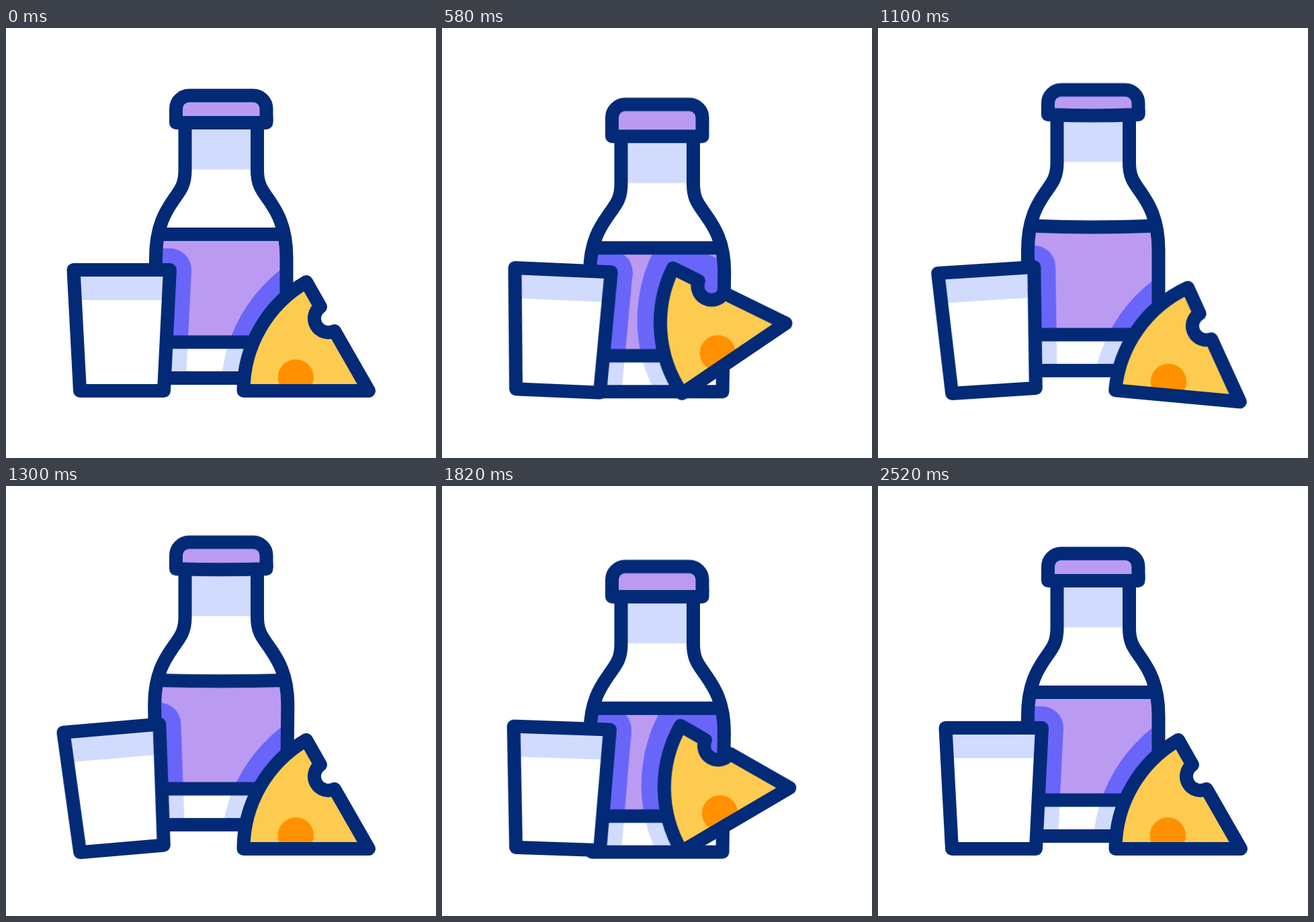
An HTML page that plays this animation: 640 px wide and 640 px high, repeating every 2.58 s.

```html
<!DOCTYPE html>
<html lang="en">
<head>
<meta charset="utf-8">
<title>Dairy</title>
<style>
  html, body { margin: 0; width: 100%; height: 100%; overflow: hidden; background: #fff; }
  svg { display: block; width: 100%; height: 100%; }

  .line { fill: none; stroke: #032a77; stroke-width: 20; stroke-linecap: round; stroke-linejoin: round; }
  .lilac { fill: #bb9bf2; }
  .pale { fill: #d1dbfd; }
  .shade { fill: currentColor; stroke: currentColor; stroke-linejoin: round; }

  .body, .cap, .glass, .cheese, .sides, .bands {
    animation: 2580ms cubic-bezier(.333, 0, .667, 1) infinite;
  }
  .body { animation-name: bounce; }
  .cap { animation-name: follow; }
  .glass { animation-name: sway; transform-origin: 172px 540px; }
  .cheese { animation-name: rock; transform-origin: 362px 536px; }
  .sides { animation-name: bulge; }
  .bands { animation-name: sag; }

  @keyframes bounce {
    0%, 10.1% { transform: translateY(0); }
    27.3% { transform: translateY(25px); }
    48.1% { transform: translateY(-18.5px); }
    68% { transform: translateY(24.5px); }
    93%, 100% { transform: translateY(0); }
  }
  @keyframes follow {
    0%, 11.6% { transform: translateY(0); }
    28.1% { transform: translateY(18px); }
    49.6% { transform: translateY(-17px); }
    69.4% { transform: translateY(19.5px); }
    93.4%, 100% { transform: translateY(0); }
  }
  @keyframes sway {
    0%, 7.75% { transform: rotate(0deg); }
    26.2% { transform: rotate(2.8deg); }
    48.8% { transform: rotate(-5.1deg); }
    65.5% { transform: rotate(2.8deg); }
    91.9% { transform: rotate(-6deg); }
    97.7%, 100% { transform: rotate(0deg); }
  }
  @keyframes rock {
    0%, 7.6% { transform: rotate(0deg); }
    25.6% { transform: rotate(-37deg); }
    45.2% { transform: rotate(7.3deg); }
    64.7% { transform: rotate(-34deg); }
    94.2%, 100% { transform: rotate(0deg); }
  }
  /* the shoulders widen while the bottle stretches */
  @keyframes bulge {
    0%, 7.75%, 43%, 93%, 100% {
      d: path("M266.5 141V212C266.5 235 258 243 248.5 257S223 294 223 342L223 521H417.5L417.5 342C417.5 294 401.5 271 392 257S374 235 374 212V141");
    }
    28.7%, 57.4% {
      d: path("M266.5 141V212C266.5 235 258 243 248.5 257S219.5 294 219.5 342L223 521H417.5L421 342C421 294 401.5 271 392 257S374 235 374 212V141");
    }
  }
  /* the cross lines bend on the way up */
  @keyframes sag {
    0%, 31%, 56%, 100% {
      d: path("M253 133V141Q320 141 387.5 141V133M227 307Q320 307 413.5 307M223 467.5H417.5");
    }
    42.6%, 47% {
      d: path("M253 133V140Q320 143 387.5 140V133M227 305.5Q320 309.5 413.5 305.5M223 467.5H417.5");
    }
  }
</style>
</head>
<body>
<svg viewBox="0 0 640 640">
  <defs>
    <clipPath id="label"><rect class="body" x="223" y="307" width="194.5" height="160.5"/></clipPath>
    <clipPath id="base"><rect class="body" x="223" y="467.5" width="194.5" height="53.5"/></clipPath>
    <path id="tumbler" d="M100.5 360H244L235 540H110Z"/>
    <path id="wedge" d="M353.5 540A187 187 0 0 1 447 378L468 415A20.9 20.9 0 0 0 489 451L540 540Z"/>
    <path id="wedgeShade" d="M320 541A230 230 0 0 1 466 327Q471 337 476 345L590 542Z"/>
  </defs>

  <g class="body">
    <rect class="pale" x="266.5" y="141" width="107.5" height="69.5"/>
    <rect class="lilac" x="223" y="307" width="194.5" height="160.5"/>
  </g>

  <!-- shadows of the glass and the cheese on the bottle -->
  <g clip-path="url(#label)" color="#6a65f9">
    <g class="glass"><use href="#tumbler" class="shade" stroke-width="64"/></g>
    <g class="cheese"><use href="#wedgeShade" fill="currentColor"/></g>
  </g>
  <g clip-path="url(#base)" color="#d1dbfd">
    <g class="glass"><use href="#tumbler" class="shade" stroke-width="64"/></g>
    <g class="cheese"><use href="#wedgeShade" fill="currentColor"/></g>
  </g>

  <g class="cap">
    <path class="line" style="fill: #bb9bf2; stroke-linecap: butt"
      d="M253 139V120A19.5 19.5 0 0 1 272.5 100.5H368A19.5 19.5 0 0 1 387.5 120V139"/>
  </g>
  <g class="body">
    <path class="line sides"
      d="M266.5 141V212C266.5 235 258 243 248.5 257S223 294 223 342L223 521H417.5L417.5 342C417.5 294 401.5 271 392 257S374 235 374 212V141"/>
    <path class="line bands"
      d="M253 133V141Q320 141 387.5 141V133M227 307Q320 307 413.5 307M223 467.5H417.5"/>
  </g>

  <g class="glass">
    <use href="#tumbler" fill="#fff"/>
    <path class="pale" d="M100.5 360H244L241.8 405H102.9Z"/>
    <use href="#tumbler" class="line"/>
  </g>

  <g class="cheese">
    <use href="#wedge" fill="#fdcb50"/>
    <circle cx="431.3" cy="520" r="26.7" fill="#ff9100"/>
    <use href="#wedge" class="line"/>
  </g>
</svg>
</body>
</html>
```
